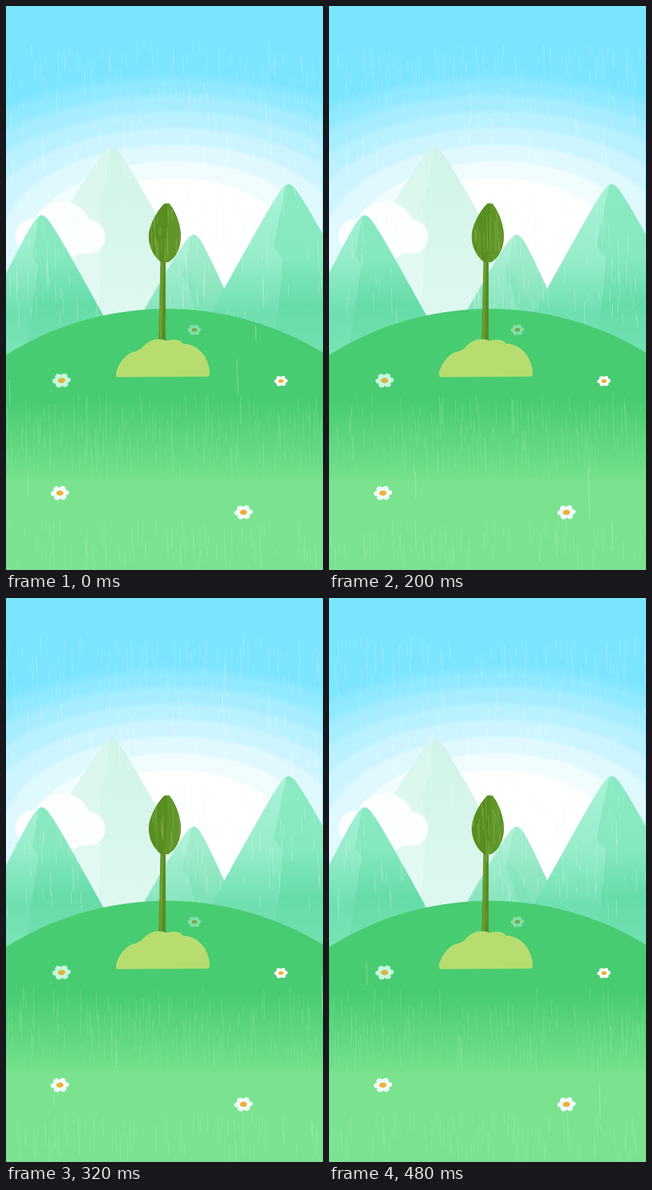
Write an HTML page that moves like this. It is 562 px wide and 997 px high and loops after 520 ms.

```html
<!DOCTYPE html>
<html lang="en">
<head>
<meta charset="utf-8">
<title>Seedling in the rain</title>
<style>
html, body { margin: 0; width: 100%; height: 100%; overflow: hidden; background: #7be5ff; }
svg { display: block; width: 562px; height: 997px; }
</style>
</head>
<body>
<svg viewBox="0 0 562 997" xmlns="http://www.w3.org/2000/svg">
  <defs>
    <radialGradient id="sky" gradientUnits="userSpaceOnUse" cx="0" cy="0" r="320" gradientTransform="translate(298 420) scale(1.75 1)"></radialGradient>
    <linearGradient id="lit" gradientUnits="userSpaceOnUse" x1="0" y1="315" x2="0" y2="600">
      <stop offset="0" stop-color="#a8f3d6"/><stop offset=".45" stop-color="#97edca"/>
      <stop offset=".8" stop-color="#6fdfb0"/><stop offset="1" stop-color="#78e2b4"/>
    </linearGradient>
    <linearGradient id="shade" gradientUnits="userSpaceOnUse" x1="0" y1="315" x2="0" y2="600">
      <stop offset="0" stop-color="#8ceac3"/><stop offset=".45" stop-color="#86e8bf"/>
      <stop offset=".75" stop-color="#65dca8"/><stop offset="1" stop-color="#70dfae"/>
    </linearGradient>
    <linearGradient id="farLit" gradientUnits="userSpaceOnUse" x1="0" y1="250" x2="0" y2="545">
      <stop offset="0" stop-color="#d8f6ec"/><stop offset="1" stop-color="#e6faf5"/>
    </linearGradient>
    <linearGradient id="farShade" gradientUnits="userSpaceOnUse" x1="0" y1="250" x2="0" y2="545">
      <stop offset="0" stop-color="#d1f4e7"/><stop offset="1" stop-color="#dff8f0"/>
    </linearGradient>
    <linearGradient id="grass" gradientUnits="userSpaceOnUse" x1="0" y1="700" x2="0" y2="840">
      <stop offset="0" stop-color="#48cc71"/><stop offset=".96" stop-color="#74e08a"/><stop offset="1" stop-color="#7be38f"/>
    </linearGradient>
    <path id="bud" d="M281 349H289C299 359 310 386 310 407C310 427 301 446 287 453H275C262 443 253 427 253 407C253 386 270 359 281 349Z"/>
    <path id="stem" d="M274 445H283V594H270.500Z"/>
    <clipPath id="plantClip"><use href="#bud"/><use href="#stem"/></clipPath>
  </defs>

  <rect width="562" height="997" fill="url(#sky)"/>
  <rect x="561" width="1" height="406" fill="#7be5ff"/>
  <g id="farHills"></g>
  <g id="cloud" fill="#fdffff">
    <circle cx="48" cy="407" r="31"/><circle cx="99" cy="397" r="52"/>
    <circle cx="146" cy="408" r="30"/><rect x="48" y="400" width="98" height="38"/>
  </g>
  <g id="nearHills"></g>
  <g id="air"></g>

  <path fill="url(#grass)" d="M0 617A535 535 0 0 1 562 613V997H0Z"/>
  <g id="ground"></g>
  <g id="flowers"></g>

  <use href="#stem" fill="#588c23"/>
  <path fill="#6a9a30" d="M274 445H279L276 594H270.500Z"/>
  <use href="#bud" fill="#588d20"/>
  <path fill="#609629" d="M285 349H289C299 359 310 386 310 407C310 427 301 446 287 453H279C286 420 288 382 285 349Z"/>
  <g id="plant" clip-path="url(#plantClip)"></g>
  <path fill="#b7dd70" d="M197 656C193 652 196 642 202 632C209 621 218 612 229 611Q235 608 239 606C249 594 260 589 270 589Q279 589 285 592Q295 588 305 591Q311 592 314 597C329 597 343 605 352 619C358 629 361 640 361 650Q360 655 358 655Z"/>
  <g id="front"></g>
</svg>
<script>
const STEP = 40, STEPS = 13, W = 562;
const $ = id => document.getElementById(id);

function add(parent, tag, attrs) {
  const el = document.createElementNS('http://www.w3.org/2000/svg', tag);
  for (const k in attrs) el.setAttribute(k, attrs[k]);
  parent.appendChild(el);
  return el;
}

// Soft-edged rings from a white centre out to blue
function paintSky(count, inner) {
  const gap = (1 - inner) / count;
  for (let i = 0; i <= count; i++) {
    const u = (i / count) ** 1.15;
    const color = `rgb(${255 - 132 * u}, ${255 - 26 * u}, 255)`;
    const r = inner + gap * (i - 1);
    add($('sky'), 'stop', { offset: r + gap * .4 * u, 'stop-color': color });
    add($('sky'), 'stop', { offset: r + gap * (1 - .3 * u), 'stop-color': color });
  }
}

// Rounded peak with straight flanks; the ridge path splits it into two faces
function mountain(group, x, y, left, right, ridge, tone, opacity = 1) {
  const round = 13, reach = 240;
  const flank = (slope, dir) => {
    let d = '';
    for (let s = 0; s <= reach; s += 4) {
      d += `L${x + dir * s} ${(y + slope * (Math.hypot(s, round) - round)).toFixed(1)}`;
    }
    return d;
  };
  const base = Math.max(545, y + 310);
  const id = `peak${x}`;
  const clip = add(add(group, 'clipPath', { id }), 'path', {
    d: `M${x} ${y}${flank(right, 1)}L${x} 1200L${x} ${y}${flank(left, -1)}L${x} 1200Z`
  });
  const g = add(group, 'g', { 'clip-path': `url(#${id})`, opacity });
  const [lit, shade] = tone;
  add(g, 'rect', { x: x - reach, y, width: 2 * reach, height: base - y, fill: `url(#${lit})` });
  add(g, 'path', { d: `M${x - 4} ${y}${ridge}V${base}H${x + reach}V${y}Z`, fill: `url(#${shade})` });
}

function flower(x, y, size, petal, heart) {
  const g = add($('flowers'), 'g', { transform: `translate(${x} ${y}) rotate(-4) scale(${size})`, fill: petal });
  for (let i = 0; i < 6; i++) {
    const a = i * Math.PI / 3;
    add(g, 'ellipse', { cx: 10.6 * Math.cos(a), cy: 8.4 * Math.sin(a), rx: 5.8, ry: 4.8 });
  }
  add(g, 'ellipse', { rx: 9, ry: 7 });
  add(g, 'ellipse', { rx: 6.5, ry: 4.6, fill: heart });
}

function random(seed) {
  let s = seed * 7919;
  return () => {
    s = (s + 0x6D2B79F5) | 0;
    let v = Math.imul(s ^ (s >>> 15), 1 | s);
    v = (v + Math.imul(v ^ (v >>> 7), 61 | v)) ^ v;
    return ((v ^ (v >>> 14)) >>> 0) / 4294967296;
  };
}

function rain(id, count, top, bottom, stroke, opacity, scale = 1) {
  const path = add($(id), 'path', { stroke, 'stroke-opacity': opacity, 'stroke-width': scale, fill: 'none' });
  return { path, count, top, bottom, scale };
}

paintSky(7, .36);

const far = ['farLit', 'farShade'], near = ['lit', 'shade'];
mountain($('farHills'), 188, 250, 1.57, 1.79, 'l-6 62l-15 40l8 33l-2 70l-7 90', far);
mountain($('nearHills'), 333, 404, 1.75, 2.25, 'l-16 74l12 22l10 40', near, .8);
mountain($('nearHills'), 63, 370, 2, 1.82, 'l-12 70l10 18l-7 52l-14 90', near);
mountain($('nearHills'), 501, 315, 1.81, 1.81, 'l-23 110l17 22l-4 53l-9 70', near);

flower(334, 572.5, .72, '#7fe0a8', '#7da64c');
flower(98.5, 662, 1, '#c5f8df', '#dcb443');
flower(487.5, 663, .72, '#ffffff', '#f5ad35');
flower(95.5, 861, 1, '#eefdfa', '#f2b03c');
flower(421, 895, 1, '#eefdfa', '#f2ad3a');

const layers = [
  rain('air', 110, 65, 185, '#d0f7ff', .32),
  rain('air', 50, 150, 320, '#ffffff', .35),
  rain('air', 120, 310, 570, '#d9fdec', .4),
  rain('ground', 160, 685, 840, '#92eba6', .38, 1.15),
  rain('ground', 75, 905, 997, '#adf0bc', .38),
  rain('plant', 170, 350, 470, '#a9c26b', .5, 1.1),
  rain('plant', 80, 440, 590, '#a0bc62', .4),
  rain('front', 3, 130, 590, '#eafff5', .35, 1.6),
  rain('front', 3, 600, 940, '#c4f7d0', .35, 1.6)
];

function draw(step) {
  const rnd = random(step + 1);
  for (const { path, count, top, bottom, scale } of layers) {
    let d = '';
    for (let i = 0; i < count; i++) {
      const len = (14 + 42 * rnd() ** 1.5) * scale;
      const x = rnd() * W, y = top + rnd() * (bottom - top - len);
      d += `M${x.toFixed(1)} ${y.toFixed(1)}l${(len * .025).toFixed(1)} ${len.toFixed(1)}`;
    }
    path.setAttribute('d', d);
  }
}

let last = -1;
function tick() {
  const step = Math.floor(performance.now() / STEP) % STEPS;
  if (step !== last) draw(last = step);
  requestAnimationFrame(tick);
}
tick();
</script>
</body>
</html>
```
